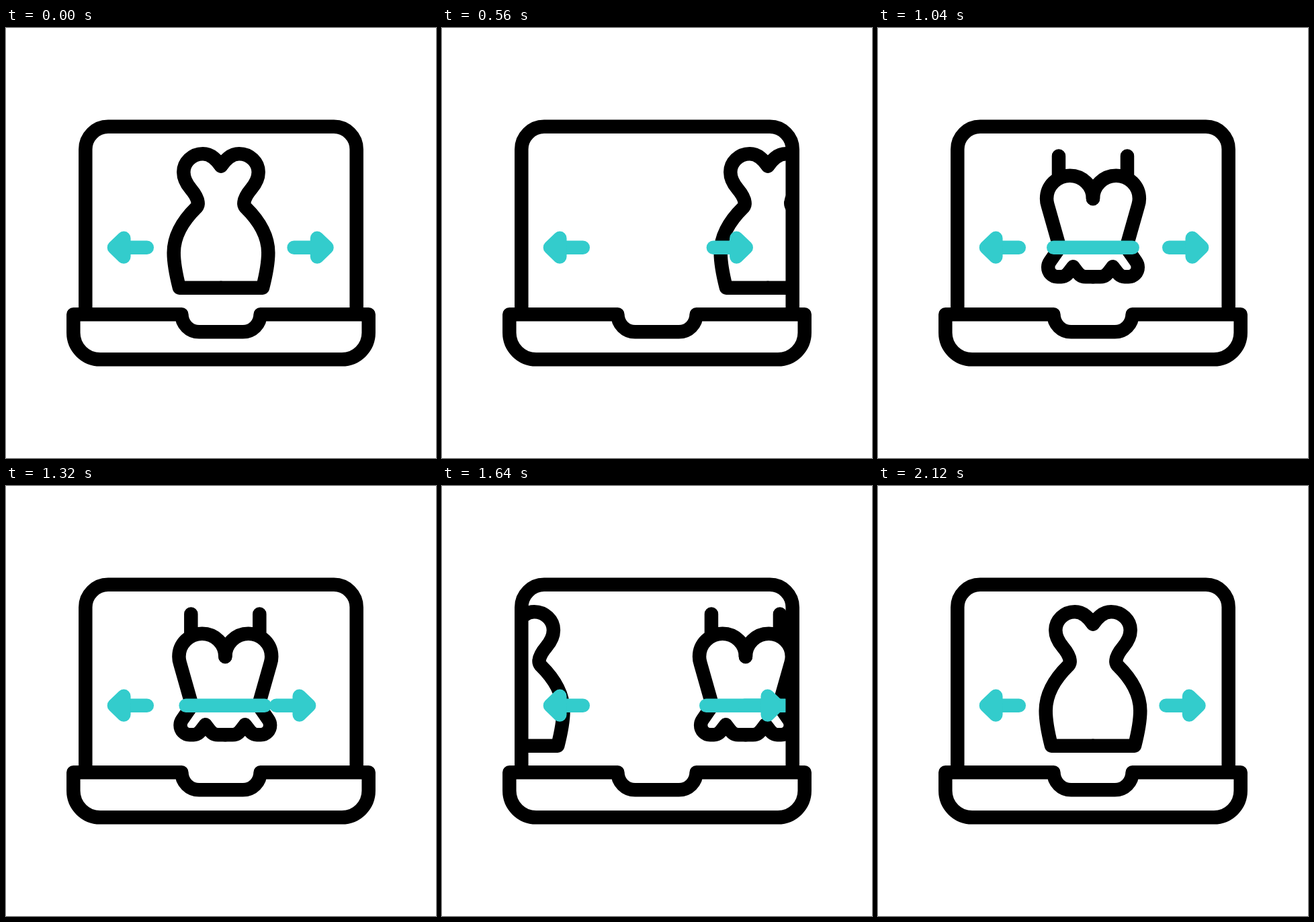
These frames come from a looping animation (640 px wide and 640 px high, 2400 ms). An HTML page with a canvas:

```html
<!DOCTYPE html>
<html lang="en">
<head>
<meta charset="utf-8">
<title>Browsing dresses on a laptop</title>
<style>
html, body { margin: 0; width: 100%; height: 100%; overflow: hidden; background: #fff; }
canvas { display: block; width: 100vmin; height: 100vmin; }
</style>
</head>
<body>
<canvas id="stage"></canvas>
<script>
const LOOP = 2400, LINE = 20.5, INK = '#000', TEAL = '#33cccc';
const canvas = document.getElementById('stage');
const ctx = canvas.getContext('2d');

const lid = new Path2D('M118.3 426V180.5A33.7 33.7 0 0 1 152 146.8H488A33.7 33.7 0 0 1 521.7 180.5V426');
const base = new Path2D('M100.3 426.3H261.4A26 26 0 0 0 287.4 452.3H352.6A26 26 0 0 0 378.6 426.3' +
  'H539.7V453.5A39.8 39.8 0 0 1 499.9 493.3H140.1A39.8 39.8 0 0 1 100.3 453.5Z');

// Half outlines, centred on x = 0
const gown = new Path2D('M0 205.5C-6 197 -14 187.3 -27 187.3C-43 187.3 -55.7 200 -55.7 214.5' +
  'C-55.7 224 -50.5 233 -45 239.5C-39.5 246 -35 254 -34.4 259.5Q-33.8 263.5 -36.5 267' +
  'C-58 288 -70.3 311 -70.3 334.5C-70.3 352 -66 371 -62 386.7H0');
const corset = new Path2D('M0 254A34.45 34.2 0 0 0 -68.9 254Q-68.9 259 -67.3 264L-49.5 326.7L-64 347.5' +
  'Q-66.8 351.5 -66.8 356C-66.8 364 -60.5 370.3 -53 370.3H-47C-39 370.3 -36 363.5 -29.5 355.2' +
  'C-23 363.5 -20 370.3 -11 370.3H0M-51 190.6V221');
const belt = new Path2D('M-58.7 326.7H58.7');
const shaft = new Path2D('M209.8 326.7H178');
const head = new Path2D('M160.9 326.7L175.3 312.8V340.6Z');

// Keys are [time, value] pairs with an eased run between neighbours
const arrowKeys = [[0, 0], [515, -27], [865, 22.6], [1295, -27], [1675, 22.8], [2120, 0]];
const gownKeys = [[40, 0], [1015, 300], [1015, -300], [1453, -300], [1967, 0]];
const corsetKeys = [[493, -300], [1043, 0], [1246, 0], [2103, 300]];

function at(keys, t) {
  if (t <= keys[0][0]) return keys[0][1];
  for (let i = 1; i < keys.length; i++) {
    const [t0, v0] = keys[i - 1], [t1, v1] = keys[i];
    if (t < t1) {
      const u = (t - t0) / (t1 - t0);
      return v0 + (v1 - v0) * u * u * (3 - 2 * u);
    }
  }
  return keys[keys.length - 1][1];
}

function shifted(x, flip, draw) {
  ctx.save();
  ctx.translate(x, 0);
  if (flip) ctx.scale(-1, 1);
  draw();
  ctx.restore();
}

function mirrored(path, x) {
  for (const flip of [false, true]) shifted(x, flip, () => ctx.stroke(path));
}

function arrow(x, flip) {
  shifted(x, flip, () => {
    ctx.stroke(shaft);
    ctx.fill(head);
    ctx.stroke(head);
  });
}

function render(t) {
  const scale = canvas.width / 640;
  ctx.setTransform(scale, 0, 0, scale, 0, 0);
  ctx.fillStyle = '#fff';
  ctx.fillRect(0, 0, 640, 640);
  ctx.lineWidth = LINE;
  ctx.lineCap = ctx.lineJoin = 'round';

  ctx.save();
  ctx.beginPath();
  ctx.rect(118.3, 147, 403.4, 279);
  ctx.clip();
  ctx.strokeStyle = INK;
  mirrored(gown, 320 + at(gownKeys, t));
  const x = 320 + at(corsetKeys, t);
  mirrored(corset, x);
  ctx.strokeStyle = ctx.fillStyle = TEAL;
  shifted(x, false, () => ctx.stroke(belt));
  arrow(0, false);
  arrow(638.4 + at(arrowKeys, t), true);
  ctx.restore();

  ctx.strokeStyle = INK;
  ctx.lineCap = 'butt';
  ctx.stroke(lid);
  ctx.stroke(base);
}

function resize() {
  const side = Math.min(innerWidth, innerHeight) || 640;
  canvas.width = canvas.height = Math.round(side * (devicePixelRatio || 1));
}

let start = null;
function tick(now) {
  if (start === null) start = now;
  render((now - start) % LOOP);
  requestAnimationFrame(tick);
}

addEventListener('resize', resize);
resize();
render(0);
requestAnimationFrame(tick);
</script>
</body>
</html>
```
